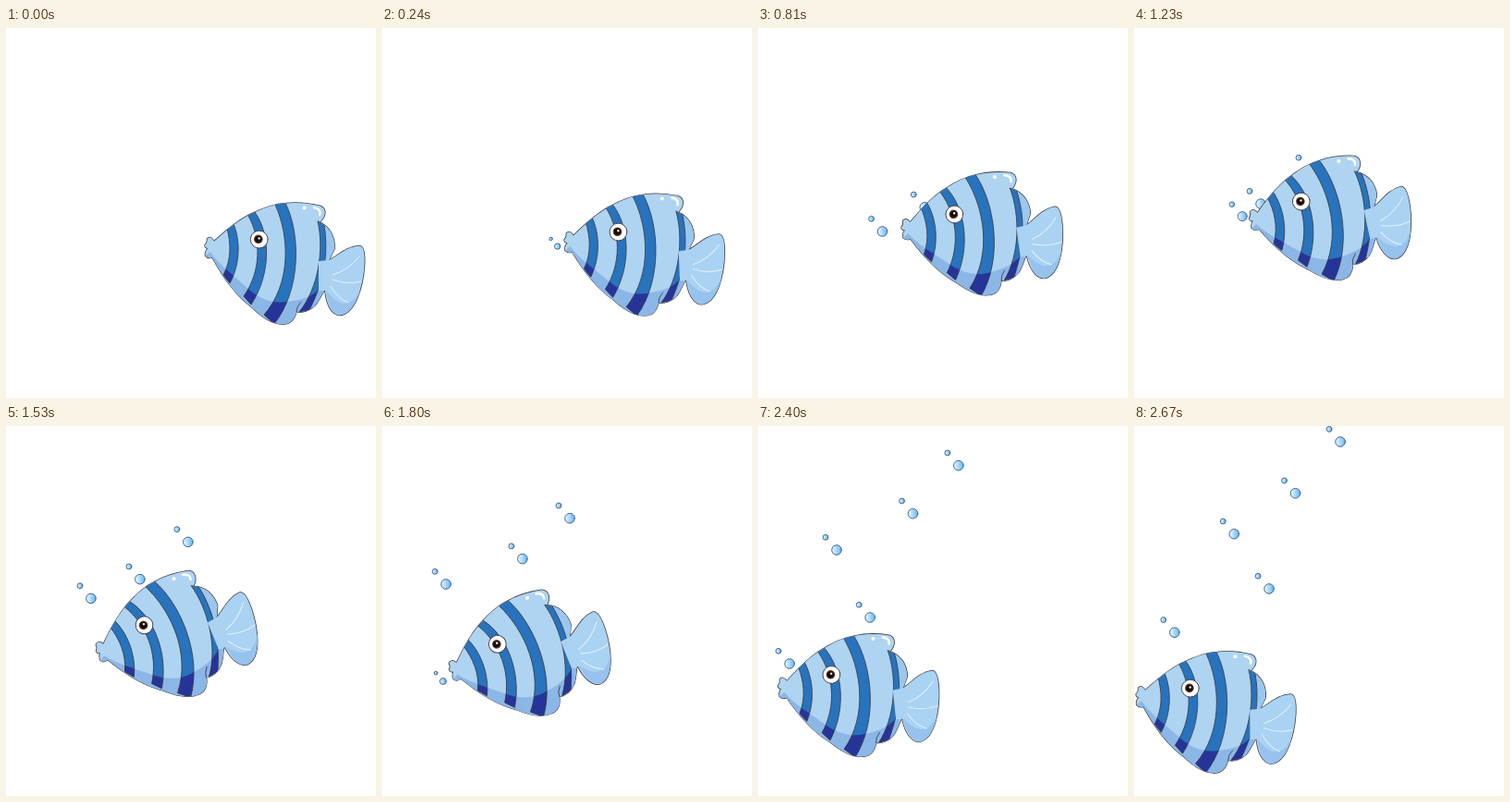
An HTML page with a canvas that plays this animation: 400 by 400 pixels, repeating every 2700 ms.

```html
<!DOCTYPE html>
<html lang="en">
<head>
<meta charset="utf-8">
<title>Striped fish</title>
<style>
html, body { margin: 0; width: 100%; height: 100%; overflow: hidden; background: #fff; }
canvas { display: block; width: 400px; height: 400px; }
</style>
</head>
<body>
<canvas id="stage" width="400" height="400"></canvas>
<script>
const ctx = document.getElementById('stage').getContext('2d');
const LOOP = 2700, STEP = 30, DIVE = 1250, GROW = 360;
const INK = '#3c3a40';
const START = { x: 301, y: 255 }, CREST = { x: 211.6, y: 206.9 }, END = { x: 86, y: 311.8 };
const CREST_TILT = 12.3;

// Each pair leaves the mouth, drifts to a turning point, then rises at a steady speed (px/s).
const pairs = [
  { born: 90, gap: 8, turn: 450, at: [172, 228], rise: [23, -95] },
  { born: 300, gap: 26, turn: 900, at: [128.5, 217], rise: [26, -81.5] },
  { born: 900, gap: 6, turn: 2010, at: [51.5, 159], rise: [86, -64] },
  { born: 1620, gap: 12, turn: 1800, at: [66, 276], rise: [92, -115] },
  { born: 1890, gap: 12, turn: 2160, at: [25.5, 287], rise: [36, -125] }
];

const lerp = (a, b, k) => a + (b - a) * k;

// Steady climb, then a slightly eased dive in which the nose dips and levels out.
function fishPose(t) {
  const diving = t > DIVE;
  const k = diving ? (t - DIVE) / (LOOP - DIVE) : t / DIVE;
  const [from, to] = diving ? [CREST, END] : [START, CREST];
  const move = diving ? k + 0.13 * k * (1 - k) : k;
  const tilt = diving ? CREST_TILT * (1 - k) + 100 * k * (1 - k) ** 2 : CREST_TILT * k;
  return { x: lerp(from.x, to.x, move), y: lerp(from.y, to.y, move), angle: -tilt * Math.PI / 180 };
}

function mouthAt(t) {
  const { x, y, angle } = fishPose(t);
  const c = Math.cos(angle), s = Math.sin(angle);
  return [x - 84 * c + 17 * s, y - 84 * s - 17 * c];
}

function pairPosition({ born, gap, turn, at, rise }, t) {
  if (t >= turn) return at.map((v, i) => v + rise[i] * (t - turn) / 1000);
  const [x, y] = mouthAt(born);
  const k = (t - born) / (turn - born);
  return [lerp(x - gap, at[0], k), lerp(y + 6, at[1], k)];
}

const bodyPath = new Path2D(`M225 230.5 C236 221 246 211 263 202 C279 194 290 190 303 189.5
  C315 188 330 190 340 192.5 C347 196 346 204 339 210 C350 215 356 226 355 239
  L349 251 L345 282 C341 288 339 294 334 300 C328 306 320 308 314 306.5
  C312 314 308 320 300 320 C289 320.5 278 314 266 302 C251 291 237 274 223 248
  Q218 249.5 215.5 246 Q215 241 218.5 238 Q215 238 215 234.5 Q218 232 217.5 228 Q221 224 225 230.5 Z`);
const rearPath = new Path2D('M339 210 C350 215 356 226 355 239 C350 252 349 270 339 287 C348 257 348 236 339 210 Z');
const shadePath = new Path2D(`M221 242 C231 257 247 268 263 283 C276 294 290 298 303 296
  C324 294 334 288 341 280 L351 330 L260 330 L210 250 Z`);
const finLine = new Path2D('M314 306.5 Q314 301 319 296');
const tailPath = new Path2D(`M338 252 L349 251 C358 247 368 236 382 235.5 C388 236 388 248 387.5 257
  C386 278 378 310 360 310.5 C351 309 346 297 345 284 L338 284 Z`);
const tailShade = new Path2D('M346 283 C358 301 373 304 383 283 C378 299 371 310 360 310.5 C351 309 348 296 346 283 Z');
const tailRays = new Path2D('M353 267 Q370 262 382 247 M353 272 Q369 278 384 274 M351 279 Q359 293 370 297');
const stripes = [
  'M239 217 C243 232 244 250 235 267 L242 276 C254 254 253 228 246 212 Z',
  'M262 203 C276 228 276 263 257 290 L265 299 C286 267 287 224 269 199 Z',
  'M291 191 C307 226 308 277 279 310 L290 320 C319 283 319 223 302 189 Z',
  'M337 209 C344 239 338 281 317 307 L328 305 C344 273 349 244 344 213 Z'
].map(d => new Path2D(d));

function fill(path, color) {
  ctx.fillStyle = color;
  ctx.fill(path);
}

function stroke(path, width, color = INK) {
  ctx.lineWidth = width;
  ctx.strokeStyle = color;
  ctx.stroke(path);
}

function disc(x, y, r, color, line, ink) {
  const p = new Path2D();
  p.arc(x, y, r, 0, Math.PI * 2);
  fill(p, color);
  if (line) stroke(p, line, ink);
}

function clipped(path, draw) {
  ctx.save();
  ctx.clip(path);
  draw();
  ctx.restore();
}

function drawBubble(x, y, r) {
  const g = ctx.createLinearGradient(x - r, y, x + r, y);
  g.addColorStop(0, '#f2faff');
  g.addColorStop(1, '#5fb6f4');
  disc(x, y, r, g, 0.9, '#2f568f');
}

function drawPair(pair, t) {
  if (t < pair.born) return;
  const [x, y] = pairPosition(pair, t);
  const scale = lerp(0.3, 1, Math.min(1, (t - pair.born) / GROW));
  drawBubble(x, y, 5.3 * scale);
  drawBubble(x - 12 * scale, y - 13.7 * scale, 2.9 * scale);
}

function drawFish({ x, y, angle }) {
  ctx.save();
  ctx.translate(x, y);
  ctx.rotate(angle);
  ctx.translate(-START.x, -START.y);

  // Outlines go under the fills so that body and tail join without a seam.
  stroke(tailPath, 1.5);
  stroke(bodyPath, 1.5);
  fill(bodyPath, '#aed4f1');
  clipped(bodyPath, () => {
    fill(rearPath, '#9bc7ef');
    fill(shadePath, '#8bb7e7');
    for (const s of stripes) {
      fill(s, '#2873bd');
      clipped(s, () => fill(shadePath, '#26349a'));
      stroke(s, 0.8);
    }
  });
  stroke(finLine, 0.8);
  fill(tailPath, '#aad2f2');
  fill(tailShade, '#96c2ed');
  stroke(tailRays, 1, '#e4f3fd');

  disc(322.5, 194.5, 2, '#fff');
  stroke(new Path2D('M333 194 Q341 196 339 202'), 2.6, '#fff');

  disc(273.7, 228.6, 9.4, '#fff', 0.9);
  disc(272.8, 228.3, 4.8, '#5b3220');
  disc(272.8, 228.3, 3.5, '#110c0c');
  disc(273.6, 227.4, 1.2, '#fff');
  ctx.restore();
}

function frame(now) {
  const t = Math.floor((now % LOOP) / STEP) * STEP;
  ctx.fillStyle = '#fff';
  ctx.fillRect(0, 0, 400, 400);
  pairs.forEach(pair => drawPair(pair, t));
  drawFish(fishPose(t));
  requestAnimationFrame(frame);
}

ctx.lineCap = ctx.lineJoin = 'round';
requestAnimationFrame(frame);
</script>
</body>
</html>
```
